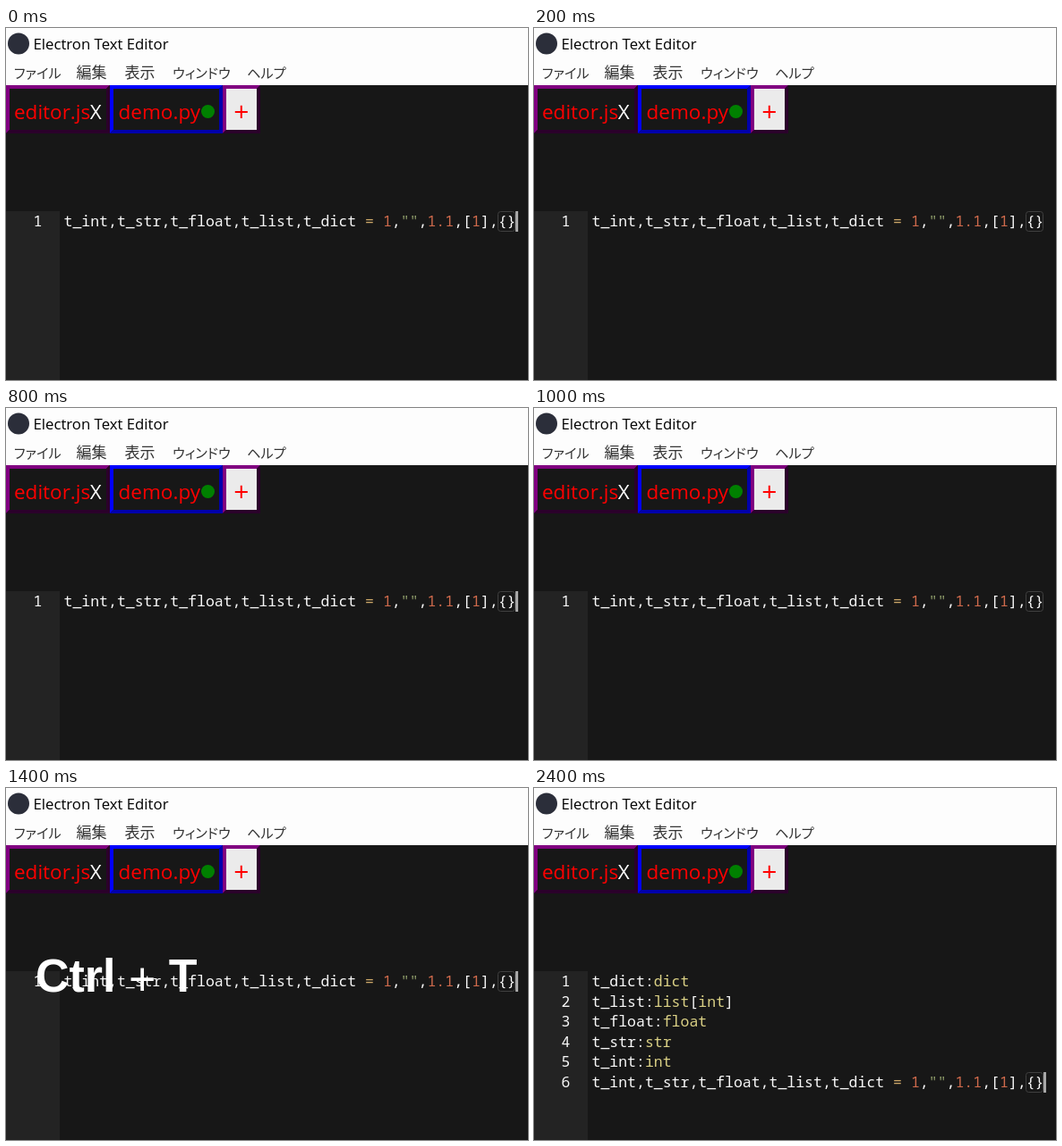
Recreate the animation shown at these times as an HTML page. Size 583 by 394 pixels, loop 3.2 s.

```html
<!DOCTYPE html>
<html lang="en">
<head>
<meta charset="utf-8">
<title>Text editor</title>
<style>
  html, body { margin: 0; width: 100%; height: 100%; overflow: hidden; background: #171717; }
  svg { display: block; }
  .title { font: 16.75px "Open Sans", sans-serif; }
  .menu { font: 300 15.2px "Noto Sans CJK JP", "Noto Sans CJK", sans-serif; font-feature-settings: "palt"; fill: #333; }
  .menu .kanji { font-size: 17px; }
  .tab { font: 22.5px "Open Sans", sans-serif; fill: #f00; }
  .tab .close { font-weight: 500; fill: #fff; }
  .tab .plus { font-size: 30px; }
  .code { font: 500 16.5px "Noto Sans Mono", monospace; fill: #f8f8f8; white-space: pre; }
  .code tspan { font-weight: 400; }
  .num { fill: #cf6a4c; }
  .op { fill: #cda869; }
  .str { fill: #8f9d6a; }
  .type { fill: #dad085; }
  .keys { font: bold 52px "Liberation Sans", Arial, sans-serif; fill: #fff; }
  .keys .thin { font-weight: 400; }
</style>
</head>
<body>
<svg width="583" height="394" viewBox="0 0 583 394">
  <rect width="583" height="394" fill="#171717"/>
  <rect width="583" height="64" fill="#fdfdfd"/>
  <circle cx="14" cy="17.5" r="12" fill="#2b2e3a"/>
  <text class="title" x="30.5" y="24">Electron Text Editor</text>
  <g class="menu">
    <text x="9" y="56">ファイル</text>
    <text class="kanji" x="78.5" y="56">編集</text>
    <text class="kanji" x="132.5" y="56">表示</text>
    <text x="186" y="56">ウィンドウ</text>
    <text x="269" y="56">ヘルプ</text>
  </g>

  <g class="tab">
    <path d="M0 64H116L112 68H4V114L0 118Z" fill="#800080"/>
    <path d="M116 64V118H0L4 114H112V68Z" fill="#2b002b"/>
    <path d="M116 64H242L238 68H120V114L116 118Z" fill="#00f"/>
    <path d="M242 64V118H116L120 114H238V68Z" fill="#0000ab"/>
    <rect x="246" y="68" width="34" height="46" fill="#ebebeb"/>
    <path d="M242 64H284L280 68H246V114L242 118Z" fill="#800080"/>
    <path d="M284 64V118H242L246 114H280V68Z" fill="#2b002b"/>
    <text x="9" y="101.5">editor.js</text>
    <text class="close" x="93.8" y="101.5">X</text>
    <text x="125.5" y="101.5">demo.py</text>
    <circle cx="225.5" cy="93.5" r="7.5" fill="#008000"/>
    <text class="plus" x="254.3" y="103.5">+</text>
  </g>

  <rect y="205" width="60" height="189" fill="#232323"/>
  <g class="code">
    <g id="annotations"></g>
    <g id="assignment">
      <text id="lineNumber" x="30.5" y="222">1</text>
      <rect x="549.5" y="205.5" width="19" height="22" rx="3" fill="none" stroke="#404040"/>
      <text x="64.5" y="222">t_int,t_str,t_float,t_list,t_dict <tspan class="op">=</tspan> <tspan class="num">1</tspan>,<tspan class="str">""</tspan>,<tspan class="num">1.1</tspan>,[<tspan class="num">1</tspan>],{}</text>
      <rect id="cursor" x="569" y="205" width="3" height="23" fill="#a7a7a7"/>
    </g>
  </g>
  <text id="keys" class="keys" x="33" y="228">Ctrl <tspan class="thin" dy="4">+</tspan><tspan dy="-4"> T</tspan></text>
</svg>
<script>
const LOOP = 3200, LINE_HEIGHT = 22.6;
const byId = id => document.getElementById(id);
const show = (id, on) => byId(id).setAttribute("visibility", on ? "visible" : "hidden");
const span = (text, kind) => `<tspan class="${kind}">${text}</tspan>`;

const annotations = [
  "t_dict:" + span("dict", "type"),
  "t_list:" + span("list", "type") + "[" + span("int", "type") + "]",
  "t_float:" + span("float", "type"),
  "t_str:" + span("str", "type"),
  "t_int:" + span("int", "type")
];
byId("annotations").innerHTML = annotations.map((line, i) => {
  const y = 222 + i * LINE_HEIGHT;
  return `<text x="30.5" y="${y}">${i + 1}</text><text x="64.5" y="${y}">${line}</text>`;
}).join("");

function draw(t) {
  const annotated = t >= 2400;
  const cursorOff = t < 1400 && t % 800 >= 200 && t % 800 < 400;
  show("annotations", annotated);
  show("cursor", !cursorOff);
  show("keys", t >= 1400 && !annotated);
  byId("lineNumber").textContent = annotated ? annotations.length + 1 : 1;
  const shift = annotated ? annotations.length * LINE_HEIGHT : 0;
  byId("assignment").setAttribute("transform", `translate(0 ${shift})`);
}

const start = performance.now();
function tick() {
  draw((performance.now() - start) % LOOP);
  requestAnimationFrame(tick);
}
tick();
</script>
</body>
</html>
```
